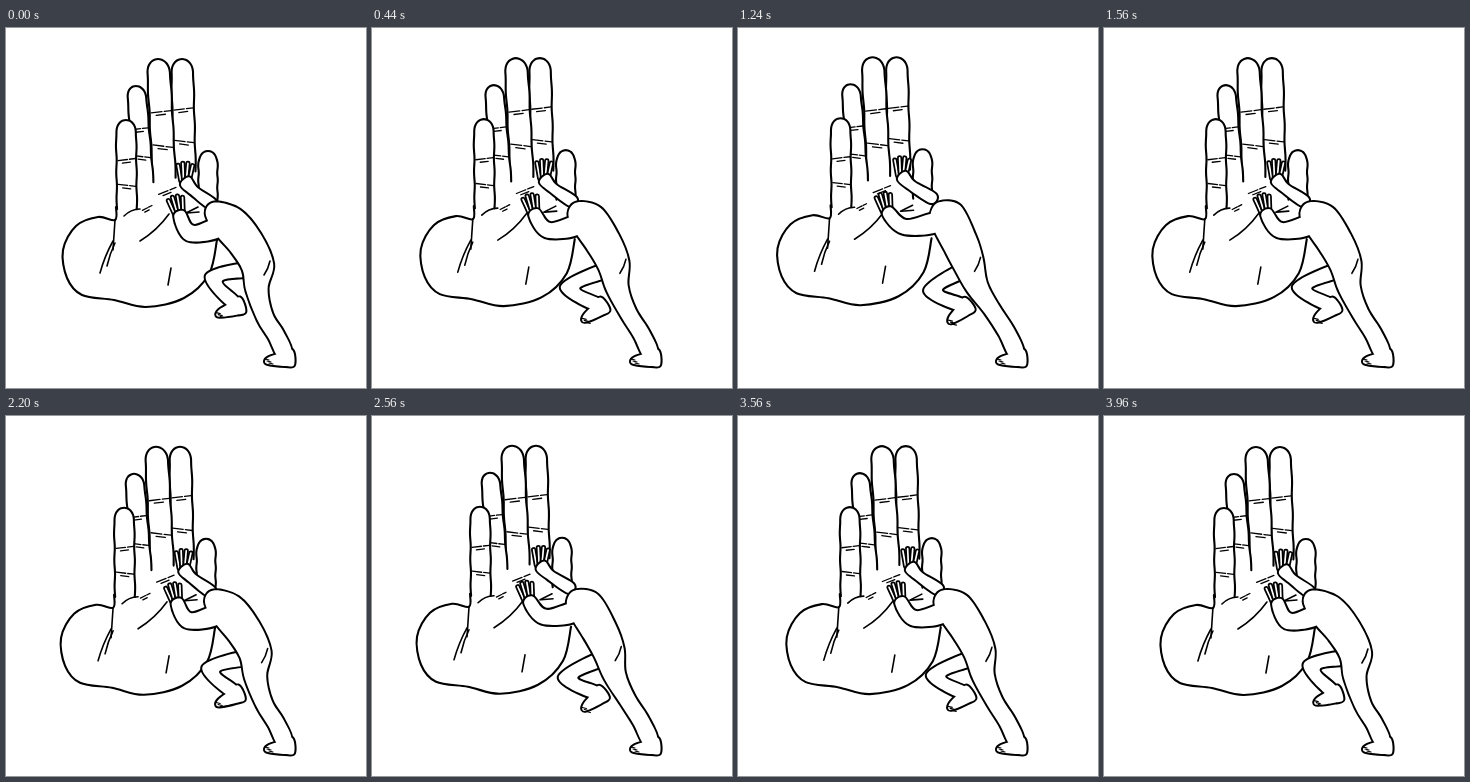
These frames come from a looping animation (360x360 px, 4000 ms). An HTML page with a canvas:

```html
<!DOCTYPE html>
<html lang="en">
<head>
<meta charset="utf-8">
<title>Pushing the hand</title>
<style>
html, body { margin: 0; height: 100%; overflow: hidden; background: #fff; }
canvas { display: block; }
</style>
</head>
<body>
<canvas width="360" height="360"></canvas>
<script>
const ctx = document.querySelector('canvas').getContext('2d');
const INK = '#000', PAPER = '#fff';
const PERIOD = 2000, STEP = 40;

// Joints: x, y, travel x, travel y, half width.
const spine = [
  [204, 180, -8, 0, 7], [222, 194, -15, -6, 17], [240, 215, -20, 0, 17], [252, 239, -24, -4, 15],
  [251, 262, -13, -3, 10.5], [259, 289, -6, -9, 8], [270, 307, -2, -4, 8], [279, 326, 0, 0, 7]
];
const farArm = [[207, 177, -13, -7, 5], [188, 163, -16, -6, 4.5], [179, 153, -17, -6, 5.5]];
const nearArm = [[212, 200, -15, -6, 9], [184, 205, -20, -7, 6.5], [173, 186, -27, -3, 5.5]];
const backLeg = [[247, 241, -19, -1, 6.5], [208, 250, -13, 12, 4.5], [228, 275, -5, 2, 6]];

// Giant fingers, back to front: tip x, tip y, lean, length, width.
const giantFingers = [
  [202, 123, 0, 55, 19], [176, 31, 3, 125, 22], [152, 31, 7, 132, 23],
  [130, 58, 9, 107, 19], [120, 92, 1, 99, 20]
];
const ball = [
  [110, 179], [109, 192], [92, 189], [70, 198], [57, 222], [61, 250], [76, 267],
  [108, 272], [140, 279], [178, 270], [203, 246], [211, 212]
];

// Smooth curve through all points.
function trace(points, closed = false) {
  const n = points.length;
  const at = i => points[closed ? (i + n) % n : Math.max(0, Math.min(n - 1, i))];
  ctx.beginPath();
  ctx.moveTo(...points[0]);
  for (let i = 0; i < (closed ? n : n - 1); i++) {
    const [p, q, r, s] = [at(i - 1), at(i), at(i + 1), at(i + 2)];
    ctx.bezierCurveTo(q[0] + (r[0] - p[0]) / 6, q[1] + (r[1] - p[1]) / 6,
      r[0] - (s[0] - q[0]) / 6, r[1] - (s[1] - q[1]) / 6, ...r);
  }
}

function ink(width = 2, color = INK) {
  ctx.lineWidth = width;
  ctx.strokeStyle = color;
  ctx.stroke();
}

function line(points, width, color) {
  trace(points);
  ink(width, color);
}

function arc(x1, y1, x2, y2, bend = 0, width = 1.6) {
  ctx.beginPath();
  ctx.moveTo(x1, y1);
  ctx.quadraticCurveTo((x1 + x2 - (y2 - y1) * bend) / 2, (y1 + y2 + (x2 - x1) * bend) / 2, x2, y2);
  ink(width);
}

// One outline around several overlapping shapes.
function union(shapes) {
  for (const shape of shapes) {
    trace(shape, true);
    ink(4);
  }
  ctx.fillStyle = PAPER;
  for (const shape of shapes) {
    trace(shape, true);
    ctx.fill();
  }
}

const pose = (joints, weight) => joints.map(([x, y, dx, dy, r]) => [x + dx * weight, y + dy * weight, r]);

// Both sides of a joint chain, mitred where it bends.
function limb(chain) {
  const angles = chain.slice(1).map(([x, y], i) => Math.atan2(y - chain[i][1], x - chain[i][0]));
  const sides = chain.map(([x, y, r], i) => {
    const before = angles[Math.max(0, i - 1)], after = angles[Math.min(i, angles.length - 1)];
    const turn = Math.atan2(Math.sin(after - before), Math.cos(after - before));
    const normal = before + turn / 2 + Math.PI / 2;
    const reach = r / Math.cos(turn / 2);
    const dx = Math.cos(normal) * reach, dy = Math.sin(normal) * reach;
    return [[x + dx, y + dy], [x - dx, y - dy]];
  });
  return [...sides.map(s => s[0]), ...sides.map(s => s[1]).reverse()];
}

function foot([x, y], angle) {
  const c = Math.cos(angle), s = Math.sin(angle);
  return [[7, -4], [9, 11], [0, 12], [-17, 10], [-20, 7], [-16, 3], [-7, 0]]
    .map(([u, v]) => [x + u * c - v * s, y + u * s + v * c]);
}

function toes(shape) {
  const [x, y] = shape[4];
  for (let i = 0; i < 3; i++) arc(x + i * 2, y - 2 + i * 2, x + 4 + i * 2, y - 1 + i * 2, 0, 1.2);
}

function smallHand([x, y], angle) {
  for (let i = -1.5; i <= 1.5; i++) {
    const a = angle + i * 0.13, length = 18 - i * i;
    const bx = x - Math.sin(angle) * i * 2.8, by = y + Math.cos(angle) * i * 2.8;
    line([[bx, by], [bx + Math.cos(a) * length, by + Math.sin(a) * length]], 5.2, INK);
    line([[bx, by], [bx + Math.cos(a) * length, by + Math.sin(a) * length]], 1.7, PAPER);
  }
}

// Two broken rows of short strokes.
function crease(x, y, width, tilt) {
  for (const [from, to, drop] of [[-0.42, 0.05, 0], [0.15, 0.45, 0], [-0.2, 0.2, 3]]) {
    arc(x + from * width, y + drop + from * width * tilt, x + to * width, y + drop + to * width * tilt, 0, 1.3);
  }
}

function giantFinger([x, y, lean, length, width], index) {
  const left = [], right = [];
  const drawn = length * 0.9, cap = width * 0.65;
  for (let i = 0; i <= 24; i++) {
    const d = drawn * (i / 24) ** 1.6;
    const round = Math.sqrt(1 - Math.max(0, 1 - d / cap) ** 2);
    const half = width / 2 * round * (1 + 0.03 * Math.cos(d / length * 7.5 * Math.PI));
    const center = x + lean * d / length;
    left.unshift([center - half, y + d]);
    right.push([center + half, y + d]);
  }
  trace([...left, ...right.slice(1)]);
  ctx.fillStyle = PAPER;
  ctx.fill();
  ink(2.1);
  if (index === 0) return;
  crease(x + lean * 0.4, y + length * 0.4, width, -0.12);
  crease(x + lean * 0.66, y + length * 0.66, width, 0.12);
}

function giantHand() {
  giantFingers.forEach(giantFinger);
  line(ball, 2.1);
  arc(109, 192, 107, 222);
  arc(107, 213, 94, 245, 0.12);
  arc(109, 215, 101, 238, 0.12);
  arc(163, 186, 134, 213, -0.2);
  arc(165, 240, 162, 257);
  arc(118, 188, 134, 181, -0.4);
  crease(141, 180, 11, -0.5);
  crease(161, 163, 20, -0.4);
  arc(180, 185, 192, 179);
  arc(181, 185, 193, 184);
}

function draw(time) {
  const push = (1 - Math.cos(time / PERIOD * 2 * Math.PI)) / 2 * 1.035;
  const bend = 1 - Math.max(0, 1 - push) ** 2.6;

  ctx.fillStyle = PAPER;
  ctx.fillRect(0, 0, 360, 360);
  ctx.lineCap = ctx.lineJoin = 'round';

  ctx.save();
  ctx.translate(-19.5 * push, -2 * push);
  giantHand();
  ctx.restore();

  // The knee folds sooner than the hip moves.
  const leg = [pose(backLeg, push)[0], ...pose(backLeg, bend).slice(1)];
  const backFoot = foot(leg[2], -0.24 - 0.36 * bend);
  union([limb(leg), backFoot]);
  toes(backFoot);

  const far = pose(farArm, push);
  smallHand(far[2], -1.55);
  union([limb(far)]);

  const trunk = pose(spine, push), near = pose(nearArm, push);
  const frontFoot = foot(trunk[7], 0);
  smallHand(near[2], -1.8);
  union([limb(trunk), limb(near), frontFoot]);
  toes(frontFoot);

  const [hipX, hipY] = trunk[3];
  arc(hipX + 12, hipY - 6, hipX + 6, hipY + 8, -0.2);
}

const start = performance.now();
function tick() {
  const elapsed = performance.now() - start;
  draw(Math.floor(elapsed / STEP) * STEP % PERIOD);
  requestAnimationFrame(tick);
}
tick();
</script>
</body>
</html>
```
